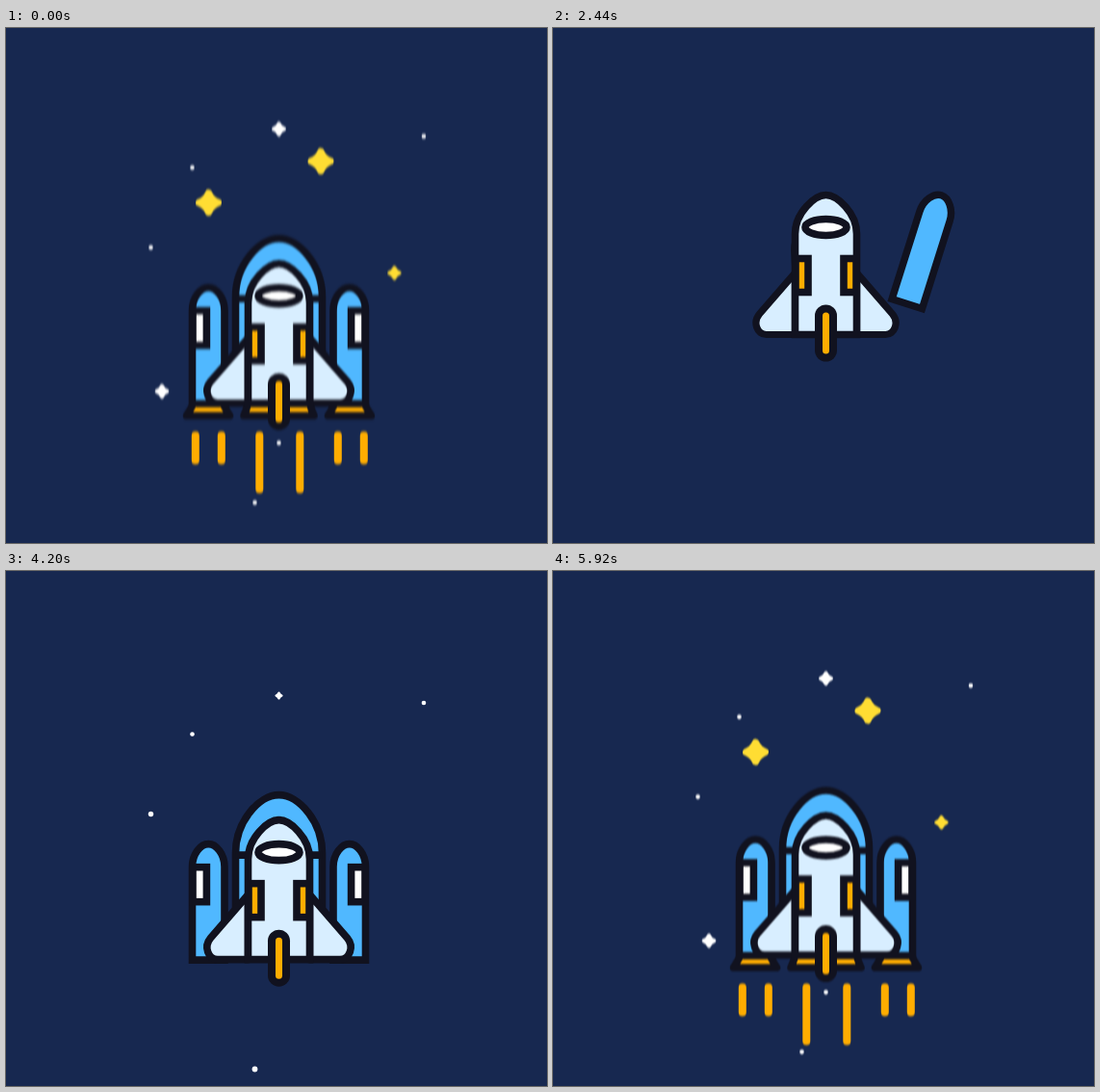
An HTML page that plays this animation: 562x535 px, repeating every 5960 ms.

```html
<!DOCTYPE html>
<html lang="en">
<head>
<meta charset="utf-8">
<title>Shuttle launch</title>
<style>
  html, body { margin: 0; width: 100%; height: 100%; overflow: hidden; background: #172850; }
  svg { display: block; width: 562px; height: 535px; }
  .ink { stroke: #11121f; stroke-width: 7.6; }
  .blue { fill: #50b8ff; }
  .pale { fill: #d8eeff; }
  .gold { fill: #ffad00; }
  .white { fill: #fff; }
  .round { stroke-linejoin: round; }
  .cap { stroke-linecap: round; }
  .fire { stroke: #ffad00; stroke-width: 8; stroke-linecap: round; }
</style>
</head>
<body>
<svg viewBox="0 0 562 535">
  <defs>
    <filter id="blur" filterUnits="userSpaceOnUse" x="0" y="-700" width="562" height="1400" color-interpolation-filters="sRGB">
      <feGaussianBlur id="amount" stdDeviation="0 0"/>
    </filter>
  </defs>
  <g id="sky"></g>
  <g id="smear"><g id="rocket">
    <g id="flames"></g>
    <g id="midNozzle"><path class="ink gold round" d="M252 336H315L320 348.5H247Z"/></g>
    <g class="side"><g class="nozzle"><path class="ink gold round" d="M195 336H225L232.5 348.5H187.5Z"/></g></g>
    <g id="tank">
      <path class="ink blue" d="M238.5 320V225C238.5 192 263 164.5 283.5 164.5S328.5 192 328.5 225V320Z"/>
      <g id="bar"><path class="ink" d="M238.5 227H328.5"/></g>
    </g>
    <g class="side"><g class="booster">
      <path class="ink blue" d="M193.5 336V239C193.5 226 202 215.5 210.25 215.5S227 226 227 239V336Z"/>
      <g class="port"><rect class="ink white" x="194" y="239.5" width="14.4" height="36"/></g>
    </g></g>
    <g class="side"><g class="wing">
      <path class="ink pale round" d="M251.5 268L212.5 313C205 322 210 335.5 220 335.5H251.5Z"/>
    </g></g>
    <g id="body"><path class="ink pale" d="M251.5 335.5V231C251.5 209 272 190.5 283.5 190.5S315.5 209 315.5 231V335.5Z"/></g>
    <g id="glass"><ellipse class="ink white" cx="283.5" cy="224" rx="21.5" ry="8.5"/></g>
    <g class="side"><g class="bay"><rect class="ink gold" x="252" y="256.5" width="13" height="35"/></g></g>
    <g id="tail">
      <path class="cap" stroke="#11121f" stroke-width="23" d="M283.5 316V352"/>
      <path class="cap" stroke="#ffad00" stroke-width="7" d="M283.5 316V352"/>
    </g>
  </g></g>
</svg>
<script>
const LOOP = 5960, EXIT = 620, MID = 283.5;
const WHITE = '#fff', YELLOW = '#ffdd33';
const $ = id => document.getElementById(id);
const all = name => [...document.querySelectorAll('.' + name)];

function add(parent, tag, attrs) {
  const el = document.createElementNS('http://www.w3.org/2000/svg', tag);
  for (const k in attrs) el.setAttribute(k, attrs[k]);
  return parent.appendChild(el);
}

// Mirror each left-hand part to the right.
all('side').forEach(left => {
  const right = left.cloneNode(true);
  right.setAttribute('transform', `translate(${2 * MID}) scale(-1 1)`);
  left.after(right);
});

const smooth = p => p * p * (3 - 2 * p);
const out = power => p => 1 - (1 - p) ** power;
const back = s => p => 1 + (s + 1) * (p - 1) ** 3 + s * (p - 1) ** 2;
const ramp = (t, from, to, curve = smooth) =>
  curve(Math.min(1, Math.max(0, (t - from) / (to - from))));

// Move, turn and scale a part about its own pivot.
function pose(el, px, py, { x = 0, y = 0, r = 0, sx = 1, sy = sx }) {
  el.style.display = sx > 0.002 && sy > 0.002 ? '' : 'none';
  el.setAttribute('transform',
    `translate(${px + x} ${py + y}) rotate(${r}) scale(${sx} ${sy}) translate(${-px} ${-py})`);
}

const flames = [];
for (const side of [-1, 1]) {
  for (const [gap, length] of [[21, 56], [60.5, 26], [87.5, 26]]) {
    const x = MID + 0.8 + side * gap;
    flames.push({ gap, length, el: add($('flames'), 'line', { x1: x, x2: x, y1: 369, class: 'fire' }) });
  }
}

// x, y, radius, colour, in order of appearance
const stars = [
  [193.5, 169.5, 2.3, WHITE], [434, 137, 2.3, WHITE],
  [150.5, 252.5, 2.3, WHITE], [258.5, 517.5, 2.3, WHITE],
  [283.5, 129.5, 7.4, WHITE], [162, 402, 7.4, WHITE],
  [403.5, 279, 7.2, YELLOW], [283.5, 455.5, 2.3, WHITE],
  [327, 163, 13.5, YELLOW], [210.5, 206, 13.5, YELLOW]
].map(([x, y, r, fill], i) => {
  const el = r < 3
    ? add($('sky'), 'circle', { r: 1, fill })
    : add($('sky'), 'path', {
        d: 'M0-.73Q.22-.22 .73 0Q.22 .22 0 .73Q-.22 .22-.73 0Q-.22-.22 0-.73Z',
        fill, stroke: fill, 'stroke-width': .54, 'stroke-linejoin': 'round'
      });
  return { x, y, r, el, start: 3680 + 120 * i };
});

function drawSky(t) {
  const late = Math.max(0, t - LOOP - 320);
  const lift = (Math.max(0, t - 5498) * .00539) ** 3.5 + late * late * .002;
  for (const { x, y, r, el, start } of stars)
    pose(el, 0, 0, { x, y: y - lift, sx: r * ramp(t, start, start + 400, back(3.3)) });
}

// Swing out from behind the body, then dock. Drawn on the left, so outward is negative.
function drawBooster(el, t) {
  const swing = ramp(t, 2200, 2960, out(5.5));
  const away = 1 - ramp(t, 2960, 3310);
  pose(el, 210.25, 276, {
    x: (73 - 116 * swing) * away,
    y: (10 - 44 * swing) * away,
    r: -20 * swing * away,
    sx: t > 2200 ? .85 + .15 * swing : 0
  });
}

function drawRocket(t) {
  const run = Math.max(0, t - 5707) * .01467;
  const y = -17 + 17 * ramp(t, 2700, 3500) + 81 * ramp(t, 3610, 4400) - run ** 2.5;
  $('rocket').setAttribute('transform', `translate(0 ${y})`);

  const nudge = -2 * (1 - ramp(t, 1000, 1150));
  pose($('body'), MID, 335.5, {
    y: nudge,
    sx: ramp(t, 650, 1080, out(2)),
    sy: ramp(t, 650, 1080, back(.5))
  });
  pose($('glass'), MID, 224, { y: nudge, sx: ramp(t, 820, 1180, back(1.7)) });
  pose($('tail'), MID, 334, { y: 41 * (1 - ramp(t, 1780, 2130)), sx: ramp(t, 760, 980) });

  all('bay').forEach((el, i) => {
    const p = ramp(t, 1280 + i * 120, 1600 + i * 120, out(2));
    pose(el, 252, 274, { y: -30 * (1 - p), sx: p });
  });
  all('wing').forEach(el => pose(el, 251.5, 335.5, { sx: ramp(t, 1880, 2600, out(2)) }));
  all('booster').forEach((el, i) => drawBooster(el, i ? t : t - 220));
  all('port').forEach((el, i) =>
    pose(el, 194, 257.5, { sx: ramp(t, 3760 + i * 120, 4060 + i * 120, back(1.7)) }));

  const rise = ramp(t, 3080, 3500, back(1.7));
  pose($('tank'), MID, 320, { sx: t > 3080 ? .6 + .4 * Math.min(1, rise) : 0, sy: .7 + .3 * rise });
  pose($('bar'), MID, 227, { sx: ramp(t, 3700, 4000) });

  pose($('midNozzle'), MID, 336, { sx: ramp(t, 4380, 4640, out(2)) });
  const tucked = 1 - ramp(t, 4460, 4860);
  all('nozzle').forEach(el =>
    pose(el, 210, 336, { x: 9 * tucked, y: -12 * tucked, sx: ramp(t, 4460, 4640) }));

  for (const { el, gap, length } of flames) {
    const p = ramp(t, 4960 + gap * 2, 5280 + gap * 2, back(1.7));
    el.style.display = p > 0 ? '' : 'none';
    el.setAttribute('y2', 369 + length * p);
  }

  // Vertical motion blur follows the climbing speed.
  const blur = Math.min(14, .2 * run ** 1.5);
  $('amount').setAttribute('stdDeviation', `0 ${blur}`);
  for (const id of ['sky', 'smear']) {
    if (blur > .05) $(id).setAttribute('filter', 'url(#blur)');
    else $(id).removeAttribute('filter');
  }
}

const begin = performance.now();
function frame() {
  const now = (performance.now() - begin) % LOOP;
  // The launch runs over the loop's seam.
  const t = now < EXIT ? now + LOOP : now;
  drawSky(t);
  drawRocket(t);
  requestAnimationFrame(frame);
}
frame();
</script>
</body>
</html>
```
